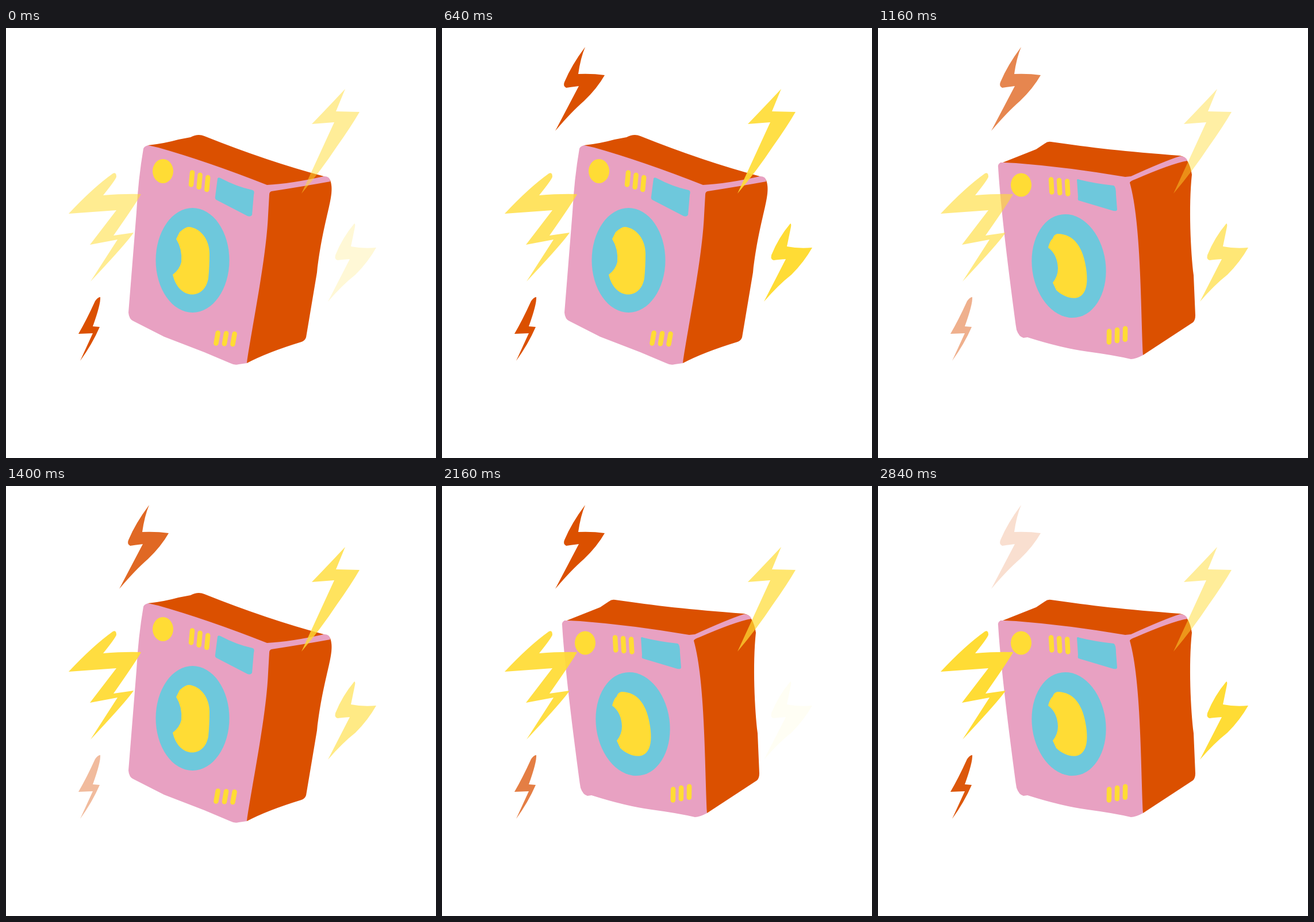
These frames come from a looping animation (748 by 748 pixels, 2880 ms). An HTML page with a canvas:

```html
<!DOCTYPE html>
<html lang="en">
<head>
<meta charset="utf-8">
<title>Shaking washing machine</title>
<style>
  html, body { margin: 0; width: 100%; height: 100%; overflow: hidden; background: #fff; }
  canvas { display: block; width: 748px; height: 748px; }
</style>
</head>
<body>
<canvas id="stage" width="748" height="748"></canvas>
<script>
const LOOP = 2880, SHAKE = 740, SHAKE_LEAD = 90, DIP_SPREAD = 480;
const ORANGE = '#db5000', PINK = '#e8a1c2', BLUE = '#6ec8dc', YELLOW = '#ffdc35';
const ctx = document.getElementById('stage').getContext('2d');

const leaning = {
  shell: new Path2D(`M247 204Q275 201 300 194L321 190Q334 183 345 188Q455 232 553 258Q564 261 565 268
    C572 295 552 330 541 425L522 538Q520 544 514 546Q455 564 419 583Z`),
  front: new Path2D(`M247 204Q240 206 239 210Q230 262 227 320L213 495Q214 507 222 510L275 537 345 564 390 583
    Q398 587 405 585L419 583C428 520 453 400 456 325L458 290Q458 285 462 284Q520 275 564 267
    Q564 258 553 258Q495 271 454 273Q350 232 265 208Z`),
  panel: new Path2D('M368 262Q369 259 373 261Q401 276 429 282Q433 283 431 290L428 325Q426 329 420 327L366 299Q363 297 364 293Z'),
  drum: new Path2D(`M318 346C340 348 354 370 354 392Q354 415 352 435C346 474 300 474 290 429
    Q302 420 305 407Q307 385 296 367L302 355Q312 346 318 346Z`),
  knob: { x: 273, y: 249, rx: 18, ry: 21, tilt: 0 },
  ring: { x: 324.5, y: 404, rx: 64, ry: 91, tilt: 0 },
  vents: [
    { x: 323, y: 262, step: [13.6, 4.3], lean: -2, height: 21 },
    { x: 367, y: 539.5, step: [14.5, .8], lean: -3.2, height: 18 }
  ]
};

const upright = {
  shell: new Path2D(`M217 234L275 211 290 201Q295 197 301 198C370 208 430 215 525 222Q535 224 538 231
    Q544 241 546 255C540 310 544 390 549 430L552 500Q552 508 548 512L461 569Z`),
  front: new Path2D(`M219 234L213 234Q208 237 209 242C213 310 228 430 241 525Q245 537 253 539L260 538
    Q320 557 365 563T440 576Q448 576 461 569C457 490 458 340 438 269Q439 266 448 263Q510 236 538 231
    Q536 223 525 223Q497 232 440 258L430 259Q330 242 240 235Z`),
  panel: new Path2D('M346 264Q347 262 351 264Q380 271 410 274Q414 276 414 290L416 316Q415 320 406 317L349 300Q347 299 348 294Z'),
  drum: new Path2D(`M312 358C342 358 357 383 362 418C372 484 330 475 310 456L304 443
    Q313 432 313 418Q312 394 296 382Q299 370 304 366Q306 359 312 358Z`),
  knob: { x: 249, y: 273, rx: 18, ry: 20.5, tilt: 0 },
  ring: { x: 332, y: 414, rx: 64, ry: 90.5, tilt: -.14 },
  vents: [
    { x: 301.7, y: 274.5, step: [14, 1.5], lean: 1.3, height: 22 },
    { x: 402, y: 537, step: [14, -2.4], lean: -.3, height: 19 }
  ]
};

// dips: [time, depth] of each moment the bolt fades.
const bolt = (color, path, ...dips) => ({ color, path: new Path2D(path), dips });
const bolts = [
  bolt(YELLOW, `M109 323Q151 278 186 253Q192 250 192 259Q190 265 169 291Q205 288 235 289
    Q229 301 187 361L222 356Q209 375 147 441L194 368 146 377 192 317Z`,
    [-160, .69], [960, .66], [1960, .12]),
  bolt(YELLOW, 'M590 106L574 145 615 146Q600 172 575 207Q548 248 514 288L571 164 532 167Q560 138 590 106Z',
    [-120, .66], [1060, .7], [1960, .5], [2780, .57]),
  bolt(YELLOW, `M606 340Q608 341 607 346L600 380Q620 384 644 382Q630 407 608 429Q585 447 560 476
    L598 402Q583 403 577 404Q571 403 573 395Q585 365 606 340Z`,
    [0, .8], [1320, .48], [2260, 1.2]),
  bolt(ORANGE, `M249 33Q241 52 237 80Q262 79 283 82Q270 105 247 127Q225 146 197 179L238 101
    Q222 103 216 104Q210 101 213 94Q225 65 249 33Z`,
    [80, 1.25], [1120, .34], [2820, .85]),
  bolt(ORANGE, 'M164 468Q165 480 151 519L163 520Q150 550 129 579L151 531 126 532Q140 508 155 475Q160 468 164 468Z',
    [1300, .78], [2400, .53])
];

function opacity(dips, t) {
  const lost = dips.reduce((sum, [time, depth]) =>
    sum + depth * Math.max(0, 1 - Math.abs(t - time) / DIP_SPREAD), 0);
  return Math.max(0, 1 - lost);
}

function fill(path, color) {
  ctx.fillStyle = color;
  ctx.fill(path);
}

function fillEllipse({ x, y, rx, ry, tilt }, color) {
  const path = new Path2D();
  path.ellipse(x, y, rx, ry, tilt, 0, Math.PI * 2);
  fill(path, color);
}

function drawVents({ x, y, step, lean, height }) {
  ctx.strokeStyle = YELLOW;
  ctx.lineWidth = 8.5;
  ctx.lineCap = 'round';
  for (let i = 0; i < 3; i++) {
    const cx = x + i * step[0], cy = y + i * step[1];
    ctx.beginPath();
    ctx.moveTo(cx - lean / 2, cy - height / 2);
    ctx.lineTo(cx + lean / 2, cy + height / 2);
    ctx.stroke();
  }
}

function drawMachine(pose) {
  fill(pose.shell, ORANGE);
  fill(pose.front, PINK);
  fill(pose.panel, BLUE);
  fillEllipse(pose.ring, BLUE);
  fill(pose.drum, YELLOW);
  fillEllipse(pose.knob, YELLOW);
  pose.vents.forEach(drawVents);
}

function draw(t) {
  ctx.globalAlpha = 1;
  ctx.clearRect(0, 0, 748, 748);
  const shakes = Math.floor((t + SHAKE_LEAD) / SHAKE);
  drawMachine(shakes % 2 ? upright : leaning);
  for (const { color, path, dips } of bolts) {
    ctx.globalAlpha = opacity(dips, t);
    fill(path, color);
  }
}

let start;
function tick(now) {
  start ??= now;
  draw((now - start) % LOOP);
  requestAnimationFrame(tick);
}
requestAnimationFrame(tick);
</script>
</body>
</html>
```
